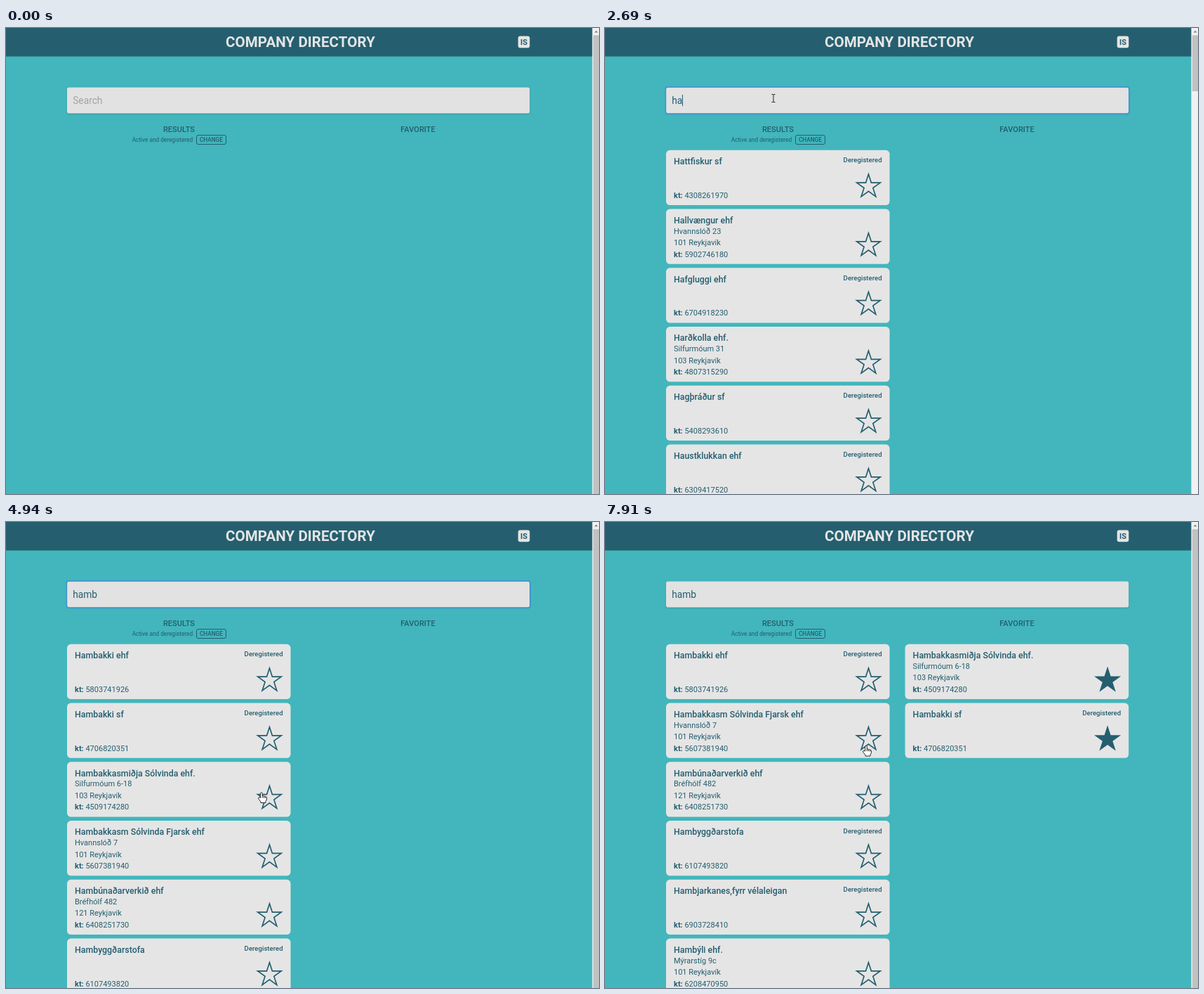
An HTML page with a canvas that plays this animation: 845 px wide and 663 px high, repeating every 8000 ms.

```html
<!DOCTYPE html>
<html lang="en">
<head>
<meta charset="utf-8">
<title>Company directory</title>
<style>
html, body { margin: 0; width: 100%; height: 100%; overflow: hidden; background: #42b6bc; }
canvas { display: block; }
</style>
</head>
<body>
<canvas id="stage" width="845" height="663"></canvas>
<script>
const ctx = document.getElementById('stage').getContext('2d');
const LOOP = 8000;
const DARK = '#245e6f', PAPER = '#e5e5e5', TEAL = '#42b6bc';
const LEFT_COL = 87, RIGHT_COL = 427.6, CARD_W = 318.6, CARD_H = 78.2, CARD_TOP = 173.8, PITCH = 83.75;

const company = (name, kt, street, town) => ({ name, kt, street, town });

const matches = [
  company('Hambakki ehf', '5803741926'),
  company('Hambakki sf', '4706820351'),
  company('Hambakkasmiðja Sólvinda ehf.', '4509174280', 'Silfurmóum 6-18', '103 Reykjavík'),
  company('Hambakkasm Sólvinda Fjarsk ehf', '5607381940', 'Hvannslóð 7', '101 Reykjavík'),
  company('Hambúnaðarverkið ehf', '6408251730', 'Bréfhólf 482', '121 Reykjavík'),
  company('Hambyggðarstofa', '6107493820'),
  company('Hambjarkanes,fyrr vélaleigan', '6903728410'),
  company('Hambýli ehf.', '6208470950', 'Mýrarstíg 9c', '101 Reykjavík')
];
const broadMatches = [
  company('Hattfiskur sf', '4308261970'),
  company('Hallvængur ehf', '5902746180', 'Hvannslóð 23', '101 Reykjavík'),
  company('Hafgluggi ehf', '6704918230'),
  company('Harðkolla ehf.', '4807315290', 'Silfurmóum 31', '103 Reykjavík'),
  company('Hagþráður sf', '5408293610'),
  company('Haustklukkan ehf', '6309417520')
];

// Pointer path: time, x, y
const path = [
  [50, 813, 648], [840, 240, 99.5], [3609, 240, 99.5], [3610, 239, 85], [3940, 239, 85],
  [4690, 360, 279], [4750, 360, 281], [4940, 364, 384.5], [5250, 372, 391],
  [5909, 372, 391], [5910, 372, 392], [6140, 372, 392], [6440, 376, 443], [6560, 376, 443],
  [6940, 372, 347], [6970, 372, 345], [7170, 372, 318]
];

function pointerAt(t) {
  const i = path.findIndex(p => p[0] > t);
  if (i < 0) return path[path.length - 1].slice(1);
  const [t0, x0, y0] = path[i - 1], [t1, x1, y1] = path[i];
  const u = (t - t0) / (t1 - t0), k = u * u * (3 - 2 * u);
  return [x0 + (x1 - x0) * k, y0 + (y1 - y0) * k];
}

function text(str, x, y, size, weight = 400, align = 'left', color = DARK) {
  ctx.font = `${weight} ${size}px Roboto, sans-serif`;
  ctx.textAlign = align;
  ctx.fillStyle = color;
  ctx.fillText(str, x, y);
}

function box(x, y, w, h, r) {
  ctx.beginPath();
  ctx.roundRect(x, y, w, h, r);
}

function fillBox(x, y, w, h, r, color) {
  box(x, y, w, h, r);
  ctx.fillStyle = color;
  ctx.fill();
}

function strokeBox(x, y, w, h, r, color, width) {
  box(x, y, w, h, r);
  ctx.strokeStyle = color;
  ctx.lineWidth = width;
  ctx.stroke();
}

function star(x, y, filled) {
  const radius = filled ? 20 : 17.6;
  ctx.beginPath();
  for (let i = 0; i < 10; i++) {
    const r = i % 2 ? radius * 0.382 : radius, a = i * Math.PI / 5;
    ctx.lineTo(x + r * Math.sin(a), y - r * Math.cos(a));
  }
  ctx.closePath();
  if (filled) {
    ctx.fillStyle = DARK;
    ctx.fill();
  } else {
    ctx.strokeStyle = DARK;
    ctx.lineWidth = 1.7;
    ctx.lineJoin = 'miter';
    ctx.miterLimit = 10;
    ctx.stroke();
  }
}

function card(x, row, c, favorite) {
  const y = CARD_TOP + row * PITCH, left = x + 11, right = x + CARD_W - 11;
  fillBox(x, y, CARD_W, CARD_H, 5.5, PAPER);
  text(c.name, left, y + 20.2, 12.375, 500);
  if (c.street) {
    text(c.street, left, y + 35, 11);
    text(c.town, left, y + 51.5, 11);
  } else {
    text('Deregistered', right, y + 17.6, 9.625, 500, 'right');
  }
  text('kt: ', left, y + 68, 11, 700);
  text(c.kt, left + ctx.measureText('kt: ').width, y + 68, 11);
  star(x + 288.5, y + 51.8, favorite);
}

function header() {
  ctx.fillStyle = '#255f6f';
  ctx.fillRect(0, 0, 836, 40.5);
  text('COMPANY DIRECTORY', 419.5, 27, 20.625, 700, 'center', PAPER);
  fillBox(729.7, 11.6, 16.6, 16.6, 3, PAPER);
  text('IS', 738, 23.9, 11, 700, 'center');
}

function searchBox(t) {
  const focused = t >= 990 && t < 5500;
  const query = 'hamb'.slice(0, [2200, 2350, 2770, 3100].filter(s => t >= s).length);
  ctx.save();
  ctx.shadowColor = 'rgba(0,0,0,0.25)';
  ctx.shadowBlur = 2;
  ctx.shadowOffsetY = 0.7;
  fillBox(87, 84.5, 659.2, 37, 2.8, '#e2e2e2');
  ctx.restore();
  if (focused) strokeBox(86.3, 83.8, 660.6, 38.4, 3.2, '#4395d3', 1.8);
  text(query || 'Search', 95.2, 107.8, 13.75, 400, 'left', query ? DARK : '#a3a3a3');
  const lastKey = t >= 3100 ? 3080 : t >= 2120 ? 2120 : 1030;
  const caretOn = t >= 2120 && t < 3100 || Math.floor((t - lastKey) / 530) % 2 === 0;
  if (focused && caretOn) {
    const w = query ? ctx.measureText(query).width : 0;
    ctx.fillStyle = DARK;
    ctx.fillRect(Math.round(95.2 + w), 95, 1, 16);
  }
}

function headings() {
  text('RESULTS', 246.5, 148.2, 11, 500, 'center');
  text('FAVORITE', 587, 148.2, 11, 500, 'center');
  text('Active and deregistered', 179.7, 162, 8.25);
  strokeBox(271.5, 152.5, 42, 13, 2.5, DARK, 1);
  text('CHANGE', 292.4, 162, 8.25, 500, 'center');
}

function loadingDots(t) {
  const phase = (Math.min(t, 2530) - 2530) / 90;
  ctx.fillStyle = '#2a6e7a';
  for (let i = 0; i < 3; i++) {
    ctx.beginPath();
    ctx.arc(236.8 + i * 9.6, 212.4 - 1.3 * Math.sin(phase + 2.1 - i), 3.5, 0, 7);
    ctx.fill();
  }
}

function lists(t) {
  if (t < 2440) return;
  if (t < 2690) return loadingDots(t);
  const favorites = [];
  if (t >= 5580) favorites.push(matches[2]);
  if (t >= 7810) favorites.push(matches[1]);
  const results = t < 3330 ? broadMatches : matches.filter(c => !favorites.includes(c));
  results.slice(0, 6).forEach((c, i) => card(LEFT_COL, i, c, false));
  favorites.forEach((c, i) => card(RIGHT_COL, i, c, true));
}

function scrollbar(t) {
  const end = t >= 2690 && t < 3330 ? 90 : 663;
  ctx.fillStyle = '#f1f1f1';
  ctx.fillRect(835.4, 0, 10, 663);
  ctx.fillStyle = '#c1c1c1';
  ctx.fillRect(836.8, 10.3, 8.2, end - 10.3);
  ctx.fillStyle = '#8a8a8a';
  ctx.fill(new Path2D('M841 3.4 L843.6 6.4 H838.4 Z'));
}

const arrowShape = new Path2D('M0 0 V11.5 L2.7 9 L4.5 13 L6.3 12.2 L4.6 8.3 H8.2 Z');
const handShape = new Path2D('M-1.3 8 V1.2 Q0 -0.8 1.3 1.2 V5.2 Q2.6 4.4 3.5 5.7 Q4.8 5 5.6 6.3 Q7.4 6 7.5 7.8 V10.5 L6 13 V15 H-1 V13.5 L-4.4 9.2 Q-4.8 7.2 -3 7.3 Z');
const knuckles = new Path2D('M1.4 5.2 V8 M3.5 5.7 V8.2 M5.6 6.3 V8.4');
const beamShape = new Path2D('M-2.5 -5.5 H-0.6 L0 -5 L0.6 -5.5 H2.5 M0 -5 V5 M-2.5 5.5 H-0.6 L0 5 L0.6 5.5 H2.5');

function pointer(t) {
  if (t < 50) return;
  const [x, y] = pointerAt(t);
  const inInput = x > 87 && x < 746 && y > 84 && y < 122;
  const starY = (y - CARD_TOP) % PITCH;
  const onStar = t > 3330 && x > 356 && x < 395 && y > CARD_TOP && starY > 30 && starY < 71;
  ctx.save();
  ctx.translate(x, y);
  ctx.lineJoin = 'round';
  if (inInput) {
    ctx.translate(Math.round(x) - x, Math.round(y) - y);
    ctx.strokeStyle = '#222';
    ctx.lineWidth = 1;
    ctx.stroke(beamShape);
  } else {
    const shape = onStar ? handShape : arrowShape;
    ctx.fillStyle = '#fff';
    ctx.strokeStyle = '#111';
    ctx.lineWidth = 0.9;
    ctx.fill(shape);
    ctx.stroke(shape);
    if (onStar) ctx.stroke(knuckles);
  }
  ctx.restore();
}

const start = performance.now();

function frame() {
  const t = (performance.now() - start) % LOOP;
  ctx.fillStyle = TEAL;
  ctx.fillRect(0, 0, 845, 663);
  header();
  searchBox(t);
  headings();
  lists(t);
  scrollbar(t);
  pointer(t);
  requestAnimationFrame(frame);
}
frame();
</script>
</body>
</html>
```
